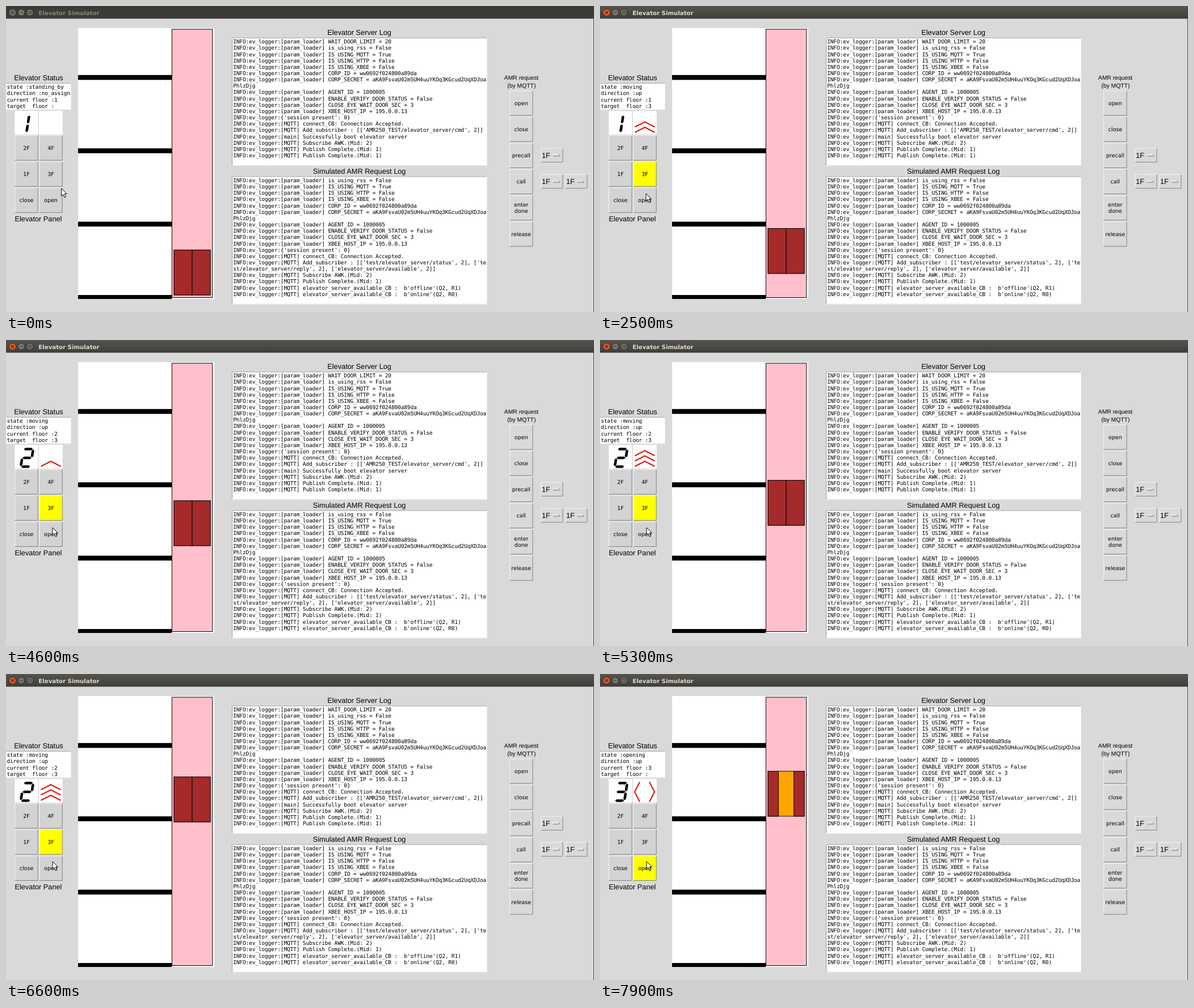
Write an HTML page that moves like this. It is 1036 px wide and 540 px high and loops after 8000 ms.

```html
<!DOCTYPE html>
<html lang="en">
<head>
<meta charset="utf-8">
<title>Elevator Simulator</title>
<style>
  html, body { margin: 0; width: 100%; height: 100%; overflow: hidden; background: #d9d9d9; }
  svg { display: block; width: 1036px; height: 540px; }
  text { white-space: pre; text-rendering: geometricPrecision; fill: #000; }
  .mono { font: 9.57px "DejaVu Sans Mono", monospace; letter-spacing: -.182px; }
  .head { font: 12.75px "Liberation Sans", sans-serif; }
  .note { font: 10.36px "Liberation Sans", sans-serif; }
  .btn { font: 9.57px "DejaVu Sans", sans-serif; }
  .title { font: bold 10.2px "DejaVu Sans", sans-serif; }
  .mid { text-anchor: middle; }
</style>
</head>
<body>
<svg id="stage" viewBox="0 0 1036 540" xmlns="http://www.w3.org/2000/svg">
  <defs>
    <linearGradient id="bar" x1="0" y1="0" x2="0" y2="1">
      <stop offset="0" stop-color="#56554d"/><stop offset="1" stop-color="#3e3d38"/>
    </linearGradient>
  </defs>
</svg>
<script>
const NS = 'http://www.w3.org/2000/svg';
const stage = document.getElementById('stage');

function add(tag, attrs, parent = stage) {
  const el = document.createElementNS(NS, tag);
  set(el, attrs);
  parent.appendChild(el);
  return el;
}
function set(el, attrs) {
  for (const k in attrs) el.setAttribute(k, attrs[k]);
}
function rect(x, y, width, height, fill, more = {}, parent) {
  return add('rect', { x, y, width, height, fill, ...more }, parent);
}
function label(text, x, y, cls, parent) {
  const el = add('text', { x, y, class: cls }, parent);
  el.textContent = text;
  return el;
}
// Bevel: upper-left and lower-right edges
function bevel(x, y, w, h, parent) {
  const line = d => add('path', { d, fill: 'none' }, parent);
  return [
    line(`M${x + .5} ${y + h - .5}V${y + .5}H${x + w - .5}`),
    line(`M${x + .5} ${y + h - .5}H${x + w - .5}V${y + .5}`)
  ];
}
function relief([up, low], sunken) {
  set(up, { stroke: sunken ? '#828282' : '#f4f4f4' });
  set(low, { stroke: sunken ? '#f4f4f4' : '#828282' });
}
function button(lines, x, y, fill) {
  const face = rect(x, y, 41.5, 44.4, fill);
  const edge = bevel(x, y, 41.5, 44.4);
  relief(edge, false);
  const words = add('g', {});
  lines.split('\n').forEach((s, i, all) =>
    label(s, x + 20.8, y + 25.4 + (i - (all.length - 1) / 2) * 11.2, 'btn mid', words));
  return { face, edge, words };
}
function textBox(x, y, w, h, lines) {
  rect(x, y, w, h, '#fff');
  const edge = bevel(x, y, w, h);
  set(edge[0], { stroke: '#9a9a9a' });
  set(edge[1], { stroke: '#ececec' });
  return lines.map((s, i) => label(s, x + 2.2, y + 10.4 + i * 11.16, 'mono'));
}
function menu(x, y) {
  rect(x, y, 39, 25.4, '#d9d9d9');
  relief(bevel(x, y, 39, 25.4), false);
  label('1F', x + 1.6, y + 17.2, 'head');
  rect(x + 21, y + 10.5, 12, 4.5, '#d9d9d9');
  relief(bevel(x + 21, y + 10.5, 12, 4.5), false);
}

// Title bar
rect(0, 0, 1036, 540, '#d9d9d9');
const bar = rect(0, 0, 1036, 22.4, '#3c3b37');
const closeDot = add('circle', { cx: 11.5, cy: 11.5, r: 6.2, stroke: '#31302c' });
add('path', { d: 'M9 9l5 5m0-5l-5 5', stroke: '#3a3029', 'stroke-width': 1.4 });
for (const cx of [27, 42]) add('circle', { cx, cy: 11.5, r: 5.8, fill: '#77766e', stroke: '#31302c' });
add('path', { d: 'M24.5 11.5h5M39.8 9.5h4.4v4h-4.4z', fill: 'none', stroke: '#3c3b37', 'stroke-width': 1.2 });
const title = label('Elevator Simulator', 57.3, 15.6, 'title');
rect(1035, 22, 1, 518, '#45443f');

// Headings and logs
label('Elevator Status', 57.4, 130.6, 'head mid');
label('Elevator Panel', 57, 380, 'head mid');
label('Elevator Server Log', 622.6, 51, 'head mid');
label('Simulated AMR Request Log', 622.6, 295.6, 'head mid');
label('AMR request', 908, 130, 'note mid');
label('(by MQTT)', 908.3, 143.8, 'note mid');

const P = 'INFO:ev_logger:[param_loader] ', M = 'INFO:ev_logger:[MQTT] ';
const settings = [
  'is_using_rss = False', 'IS_USING_MQTT = True', 'IS_USING_HTTP = False', 'IS_USING_XBEE = False',
  'CORP_ID = ww0692f024800a89da', 'CORP_SECRET = aKA9FsvaU02m5UH4uuYKOq3KGcud2UqXDJoa', 'PhlzDjg',
  'AGENT_ID = 1000005', 'ENABLE_VERIFY_DOOR_STATUS = False', 'CLOSE_EYE_WAIT_DOOR_SEC = 3',
  'XBEE_HOST_IP = 195.0.0.13'
].map(s => s === 'PhlzDjg' ? s : P + s);
const boot = [...settings, "INFO:ev_logger:{'session present': 0}", M + 'connect_CB: Connection Accepted.'];

textBox(398, 55.8, 450, 225.8, [
  P + 'WAIT_DOOR_LIMIT = 20', ...boot,
  M + "Add_subscriber : [['AMR250_TEST/elevator_server/cmd', 2]]",
  'INFO:ev_logger:[main] Successfully boot elevator server',
  M + 'Subscribe AWK.(Mid: 2)', M + 'Publish Complete.(Mid: 1)', M + 'Publish Complete.(Mid: 1)'
]);
textBox(398, 300.5, 450, 225.8, [
  ...boot,
  M + "Add_subscriber : [['test/elevator_server/status', 2], ['te",
  "st/elevator_server/reply', 2], ['elevator_server/available', 2]]",
  M + 'Subscribe AWK.(Mid: 2)', M + 'Publish Complete.(Mid: 1)',
  M + "elevator_server_available_CB :  b'offline'(Q2, R1)",
  M + "elevator_server_available_CB :  b'online'(Q2, R0)"
]);
const status = textBox(-.8, 135.8, 115.8, 47.4, ['', '', '', '']);

// Request buttons and menus
['open', 'close', 'precall', 'call', 'enter\ndone', 'release']
  .forEach((s, i) => button(s, 887, 149.2 + i * 46.2, '#d9d9d9'));
menu(942.4, 250.6);
menu(942.4, 296.8);
menu(985.4, 296.8);

// Shaft
rect(127, 39, 240, 478, '#fff');
for (let i = 0; i < 4; i++) rect(127, 121.8 + i * 129.4, 165, i < 3 ? 8.6 : 7, '#000');
rect(292.4, 41, 71.4, 473.5, '#ffc0cb', { stroke: '#000' });
const car = add('g', { stroke: '#000', 'stroke-width': .9 });
rect(296, .5, 64, 79.5, '#ffa500', {}, car);
const doors = [0, 1].map(() => rect(296, .5, 32, 79.5, '#a52a2a', {}, car));

// Indicators
rect(15.5, 185.2, 41, 41.8, '#fff');
rect(58, 185.2, 41.8, 41.8, '#fff');
const digit = add('path', {});
const arrow = add('path', { fill: 'none', stroke: '#e01b14', 'stroke-width': 2.2 });

// Panel
const keys = {};
[['2F', '4F'], ['1F', '3F'], ['close', 'open']].forEach((row, j) => row.forEach((s, i) => {
  keys[s] = button(s, 15.2 + i * 43, 228.2 + j * 46.2, '#d3d3d3');
}));

const cursor = add('path', {
  d: 'M0 0V13.2L3 10.4L5.4 16L7.8 15L5.4 9.6H9.6Z', fill: '#fff', stroke: '#000', 'stroke-linejoin': 'round'
});

// Slanted seven-segment digits; columns at L and R
const L = 28.5, R = 45.5, TOP = 192.5, MID = 208, LOW = 223.5;
const segments = {
  a: [L, TOP, R, TOP], b: [R, TOP, R, MID], c: [R, MID, R, LOW],
  d: [L, LOW, R, LOW], e: [L, MID, L, LOW], g: [L, MID, R, MID]
};
function segment([x0, y0, x1, y1], dx) {
  const h = x1 > x0 ? 1 : 0, v = 1 - h, T = 2.3;
  const pts = [
    [x0 + h * .7, y0 + v * .7], [x0 + h * 3 + v * T, y0 + v * 3 - h * T],
    [x1 - h * 3 + v * T, y1 - v * 3 - h * T], [x1 - h * .7, y1 - v * .7],
    [x1 - h * 3 - v * T, y1 - v * 3 + h * T], [x0 + h * 3 - v * T, y0 + v * 3 + h * T]
  ];
  return 'M' + pts.map(([x, y]) => `${(x + dx - (y - MID) * .16).toFixed(2)} ${y}`).join('L') + 'Z';
}
function digitPath(n) {
  const on = { 1: 'bc', 2: 'abged', 3: 'abgcd' }[n];
  return [...on].map(s => segment(segments[s], n === 1 ? -7 : 0)).join('');
}
function upArrows(n) {
  let d = '';
  for (let i = 0; i < n; i++) d += `M61.5 ${223 - i * 9.4}L79 ${214 - i * 9.4}L96.5 ${223 - i * 9.4}`;
  return d;
}
function openArrows(n) {
  const s = (n - 2) * 3.5;
  return `M${73.5 - s} 190.5L${64.5 - s} 208L${73.5 - s} 225.5M${83.5 + s} 190.5L${92.5 + s} 208L${83.5 + s} 225.5`;
}

// Motion tables: time, then values
const carTop = [[1600, 430], [1700, 424], [2500, 392], [3900, 316], [4700, 278], [4900, 267],
  [5300, 247], [5500, 235], [6600, 181], [6800, 171]];
const doorGap = [[6800, 0], [7900, 13.5]];
const pointer = [[0, 97.6, 322], [199, 97.6, 322], [200, 111, 307.5], [800, 111, 307.5], [1400, 83, 290],
  [1600, 83, 290], [2200, 81, 331], [2500, 81, 331], [3900, 82, 331]];
const active = [[0, 0], [200, 200], [900, 2500], [3900, 4900], [5100, 5500], [5700, 6200],
  [6400, 7200], [7400, 7900]];

function at(table, t) {
  let i = table.findIndex(k => k[0] > t);
  if (i < 0) i = table.length;
  if (i === 0) return table[0].slice(1);
  const a = table[i - 1], b = table[i] || a;
  const u = b === a ? 0 : (t - a[0]) / (b[0] - a[0]);
  return a.slice(1).map((v, j) => v + (b[j + 1] - v) * u);
}
// The picture only moves on 100 ms ticks inside the active spans
function tick(t) {
  const [from, to] = active.filter(s => s[0] <= t).pop();
  return Math.max(from, Math.min(to, Math.floor(t / 100) * 100));
}

function draw(t) {
  const focused = t >= 1400, pressed = t >= 1400 && t < 1600;
  const moving = t >= 1600 && t < 6800, opening = t >= 6800;
  const top = Math.round(at(carTop, t)[0]);
  const floor = opening ? 3 : top <= 301 ? 2 : 1;
  const phase = (Math.floor((t - 1700) / 400) + 2) % 3 + 1;

  set(bar, { fill: focused ? 'url(#bar)' : '#3c3b37' });
  set(closeDot, { fill: focused ? '#e4592d' : '#77766e' });
  title.style.fill = focused ? '#dfdbd2' : '#85837a';

  status[0].textContent = 'state :' + (opening ? 'opening' : moving ? 'moving' : 'standing_by');
  status[1].textContent = 'direction :' + (moving || opening ? 'up' : 'no_assign');
  status[2].textContent = 'current floor :' + floor;
  status[3].textContent = 'target  floor :' + (moving ? 3 : '');

  set(digit, { d: digitPath(floor) });
  set(arrow, { d: opening ? openArrows(phase) : t >= 1700 ? upArrows(phase) : '' });

  set(keys['3F'].face, { fill: moving ? '#ff0' : '#d3d3d3' });
  set(keys['3F'].words, { transform: pressed ? 'translate(.8 .8)' : '' });
  relief(keys['3F'].edge, pressed);
  set(keys.open.face, { fill: opening ? '#ff0' : '#d3d3d3' });

  const gap = at(doorGap, t)[0];
  set(car, { transform: `translate(0 ${top})` });
  set(doors[0], { width: 32 - gap });
  set(doors[1], { x: 328 + gap, width: 32 - gap });

  const [x, y] = at(pointer, t);
  set(cursor, { transform: `translate(${x} ${y})` });
}

const start = performance.now();
let shown = -1;
function frame() {
  const t = tick((performance.now() - start) % 8000);
  if (t !== shown) draw(shown = t);
  requestAnimationFrame(frame);
}
frame();
</script>
</body>
</html>
```
